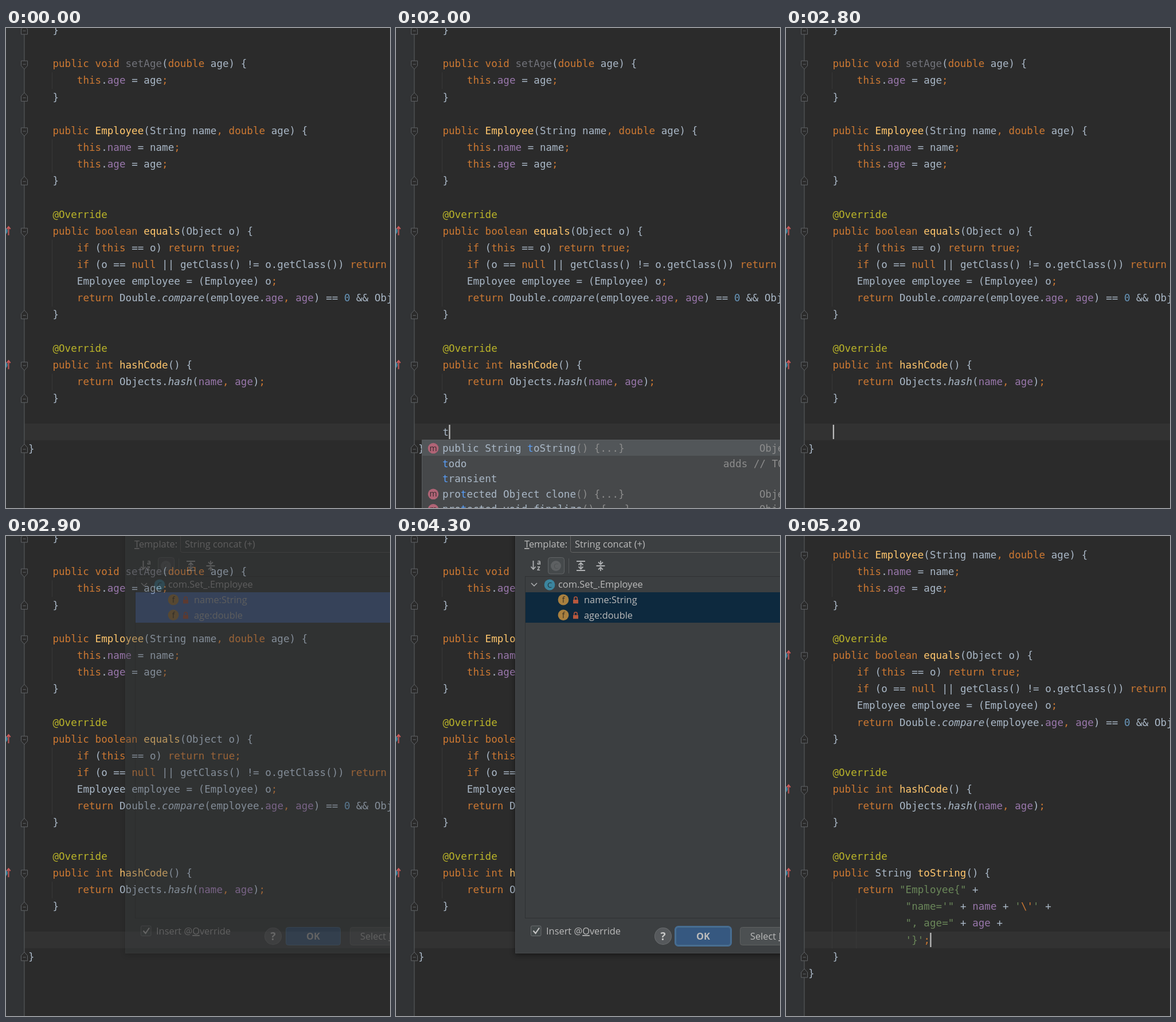
Animation, 670 px wide and 836 px high, one loop 6200 ms. Source, as an HTML page:

```html
<!DOCTYPE html>
<html lang="en">
<head>
<meta charset="utf-8">
<title>Generate toString</title>
<style>
html, body { margin: 0; width: 100%; height: 100%; overflow: hidden; background: #2b2b2b; }
svg { display: block; width: 100vw; height: 100vh; }
text { white-space: pre; fill: #bbb; }
.mono { font: 17.6px "DejaVu Sans Mono", monospace; fill: #a9b7c6; }
.ui { font: 16.4px "Open Sans", "Noto Sans", sans-serif; }
.hint { font: 13.6px "Open Sans", "Noto Sans CJK SC", "Noto Sans CJK", sans-serif; fill: #8c8c8c; }
.bold { font-weight: 700; }
.u { text-decoration: underline; }
.kw { fill: #cc7832; }
.str { fill: #6a8759; }
.num { fill: #6897bb; }
.fn { fill: #ffc66d; }
.field { fill: #9876aa; }
.note { fill: #bbb529; }
.dead { fill: #72737a; }
.it { font-style: italic; }
.match { fill: #589df6; }
.grey { fill: #8c8c8c; }
.fold { fill: #2b2b2b; stroke: #606366; }
.guide { stroke: #393939; }
.icon { fill: none; stroke: #afb1b3; stroke-width: 1.8; }
#dialog { filter: drop-shadow(0 3px 5px rgba(0, 0, 0, .45)); }
</style>
</head>
<body>
<svg id="stage" viewBox="0 0 670 836" preserveAspectRatio="none"></svg>
<script>
const LOOP = 6200, ROW = 29.15, CHAR = 10.6, LEFT = 39, BASE = 20.2;
const rowTop = i => i * ROW - 10.3;
const colX = c => LEFT + c * CHAR;
const esc = s => s.replace(/&/g, '&amp;').replace(/</g, '&lt;');
const span = (cls, s) => `<tspan class="${cls}">${esc(s)}</tspan>`;
const text = (x, y, cls, body) => `<text x="${x}" y="${y}" class="${cls}">${body}</text>`;
const rect = (x, y, w, h, fill, extra = '') =>
  `<rect x="${x}" y="${y}" width="${w}" height="${h}" fill="${fill}" ${extra}/>`;
const path = (d, extra) => `<path d="${d}" ${extra}/>`;
const disc = (x, y, r, fill) => `<circle cx="${x}" cy="${y}" r="${r}" fill="${fill}"/>`;

// Marks: ~field  !declared method  ?unused  ^static call
const TOKENS = /"[^"]*"|'}'|\\'|'|[~!?^]\w+|@\w+|\b(?:public|void|this|double|boolean|int|if|return|null|true|false)\b|\b\d+\b|[;,]|[^]/g;
const MARKS = { '~': 'field', '!': 'fn', '?': 'dead', '^': 'it' };

function paint(src, semantic) {
  return src.match(TOKENS).map(t => {
    const mark = t.length > 1 && MARKS[t[0]];
    if (mark) return semantic ? span(mark, t.slice(1)) : t.slice(1);
    if (t[0] === '@') return semantic ? span('note', t) : t;
    if (/^["']/.test(t)) return span('str', t);
    if (/^\d/.test(t)) return span('num', t);
    if (/^([;,]|\\'|\w{2,})$/.test(t)) return span('kw', t);
    return esc(t);
  }).join('');
}

function code(lines, first, semantic = true) {
  return lines.map((line, i) => {
    const src = line.trimStart();
    return src && text(colX(line.length - src.length), rowTop(first + i) + BASE, 'mono', paint(src, semantic));
  }).join('');
}

const foldStart = i => path(`M26.5 ${rowTop(i) + 9.2}h11v8.5l-5.5 6l-5.5-6zm3 6h5`, 'class="fold"');
const foldEnd = i => path(`M26.5 ${rowTop(i) + 21.3}h11v-9l-5.5-6l-5.5 6zm3-6h5`, 'class="fold"');
const guide = (x, a, b) => path(`M${x} ${rowTop(a)}V${rowTop(b + 1)}`, 'class="guide"');

function overrideIcon(i) {
  const y = rowTop(i) + 14;
  return disc(-3.5, y, 6.3, '#3e86a0') +
    path(`M4.5 ${y + 7.5}v-15m-3.2 4.2l3.2-4.2l3.2 4.2`, 'fill="none" stroke="#cb5a5a" stroke-width="1.9"');
}

const BODY = [
  '    }',
  '',
  '    public void ?setAge(double age) {',
  '        this.~age = age;',
  '    }',
  '',
  '    public !Employee(String name, double age) {',
  '        this.~name = name;',
  '        this.~age = age;',
  '    }',
  '',
  '    @Override',
  '    public boolean !equals(Object o) {',
  '        if (this == o) return true;',
  '        if (o == null || getClass() != o.getClass()) return false;',
  '        Employee employee = (Employee) o;',
  '        return Double.^compare(employee.~age, ~age) == 0 && Objects',
  '    }',
  '',
  '    @Override',
  '    public int !hashCode() {',
  '        return Objects.^hash(~name, ~age);',
  '    }'
];

const ADDED = [
  '    @Override',
  '    public String !toString() {',
  '        return "Employee{" +',
  '                "name=\'" + ~name + \'\\\'\' +',
  '                ", age=" + ~age +',
  "                '}';",
  '    }',
  '}'
];

const group = (id, body) => `<g id="${id}">${body}</g>`;

function popup(height, rows) {
  return rect(45.5, 717.5, 640, height, '#46484a', 'stroke="#5a5d5f"') +
    rect(46, 718, 640, 27, '#525659') +
    rows.map(([icon, head, match, tail, args, rightX, right], i) => {
      const y = 732 + i * 26.6;
      return (icon ? disc(65, y, 9.3, '#b06476') +
          `<text x="65" y="${y + 4.5}" class="ui" text-anchor="middle" style="font-size:14px;fill:#33282c">m</text>` : '') +
        text(81, y + 6, 'mono', span('', head) + span('match', match) + span('', tail) + span('grey', args)) +
        text(rightX, y + 6, 'mono', span('grey', right));
    }).join('');
}

const toStringRow = m => [1, 'public String ', 'toString'.slice(0, m), 'toString'.slice(m), '() {...}', 634, 'Object'];
const todoRow = m => [0, '', 'todo'.slice(0, m), 'todo'.slice(m), '', 571, 'adds // TODO'];

const popupOne = popup(140, [
  toStringRow(1),
  todoRow(1),
  [0, '', 't', 'ransient', '', 634, ''],
  [1, 'pro', 't', 'ected Object clone', '() {...}', 634, 'Object'],
  [1, 'pro', 't', 'ected void finalize', '() {...}', 634, 'Object']
]);

const popupTwo = popup(86, [toStringRow(2), todoRow(2)]) +
  text(60, 792, 'hint', 'Ctrl+向下箭头 and Ctrl+向上箭头 will move caret down and up in the editor') +
  text(538, 792, 'hint', span('match', 'Next Tip'));

function fieldRow(y, label) {
  return disc(292, y, 9.4, '#a9803f') +
    `<text x="292" y="${y + 5}" class="ui" text-anchor="middle" style="font-size:14px;fill:#382f22">f</text>` +
    rect(309, y, 9, 6.5, '#b8583d') +
    path(`M310.8 ${y}v-2.2a2.7 2.7 0 0 1 5.4 0v2.2`, 'fill="none" stroke="#b8583d" stroke-width="1.5"') +
    text(328, y + 6, 'ui', label);
}

function dialog() {
  const small = (x, y, s) => `<text x="${x}" y="${y}" class="ui bold" style="font-size:11.5px;fill:#afb1b3">${s}</text>`;
  return rect(208, -20, 480, 747, '#3c3f41') +
    path('M208.5 0V726.5H670', 'fill="none" stroke="#45484a"') +
    text(224, 20, 'ui', span('u', 'T') + 'emplate:') +
    rect(304.5, -10, 400, 38.5, '#3c3f41', 'rx="3" stroke="#646464"') +
    text(312, 20, 'ui', 'String concat (+)') +
    path('M239.5 43v15m-4-4.5l4 4.5l4-4.5', 'class="icon"') + small(246, 50, 'a') + small(246, 60, 'z') +
    rect(265.5, 37.5, 28, 28.5, '#45494b', 'rx="4" stroke="#616466"') +
    disc(279, 52, 9, '#5d6062') +
    '<text x="279" y="56.5" class="ui" text-anchor="middle" style="font-size:13px;fill:#505355">C</text>' +
    path('M301.5 39V65', 'stroke="#555759"') +
    path('M315 44h15M315 60h15M322.5 47v10m-4-6.5l4-4l4 4m-8 3l4 4l4-4', 'class="icon"') +
    path('M349.5 52h15M357 43v6m-4-3.5l4 4l4-4M357 61v-6m-4 3.5l4-4l4 4', 'class="icon"') +
    rect(225.5, 70.5, 470, 595, '#3c3f41', 'stroke="#2f3133"') +
    path('M236 82l5 5l5-5', 'class="icon" style="stroke-width:1.5"') +
    disc(268, 85, 9.4, '#3b859e') +
    '<text x="268" y="89.8" class="ui" text-anchor="middle" style="font-size:13px;fill:#22343b">C</text>' +
    text(283, 90, 'ui', 'com.Set_.Employee') +
    rect(226, 98, 460, 53, '#4b6eaf', 'id="picked"') +
    fieldRow(111, 'name:String') + fieldRow(137.7, 'age:double') +
    rect(235.5, 679, 17.5, 17.5, '#43494a', 'rx="2" stroke="#6b6d6f"') +
    path('M239.5 687.5l4 4.5l6.5-9.5', 'fill="none" stroke="#c4c4c4" stroke-width="2.2"') +
    text(262, 694, 'ui', 'Insert @' + span('u', 'O') + 'verride') +
    disc(466, 697, 15, '#6a6d6f') + disc(466, 697, 14, '#56595c') +
    '<text x="466" y="704" class="ui bold" text-anchor="middle" style="font-size:19px;fill:#c8c8c8">?</text>' +
    rect(487.5, 680.5, 97, 33, 'none', 'id="ring" rx="5" stroke="#466d94" stroke-width="3"') +
    rect(488.5, 681.5, 95, 31, '#365880', 'rx="4" stroke="#4c708c"') +
    '<text x="536" y="703" class="ui bold" text-anchor="middle">OK</text>' +
    rect(600.5, 681.5, 130, 31, '#4c5052', 'rx="4" stroke="#5e6060"') +
    text(618, 703, 'ui', 'Select ' + span('u', 'N') + 'one');
}

const stage = document.getElementById('stage');
stage.innerHTML =
  rect(0, 0, 670, 836, '#2b2b2b') +
  rect(0, 0, 32, 836, '#313335') +
  rect(32, 689, 638, 29, '#323232') +
  path('M31.9 0V836', 'stroke="#55585a" stroke-width="1.2"') +
  group('editor',
    guide(80.5, 3, 3) + guide(80.5, 7, 8) + guide(80.5, 13, 16) + guide(80.5, 21, 21) +
    [2, 6, 12, 20].map(foldStart).join('') + [0, 4, 9, 17, 22].map(foldEnd).join('') +
    overrideIcon(12) + overrideIcon(20) + code(BODY, 0) +
    group('before', foldEnd(25) + code(['}'], 25)) +
    group('after',
      guide(80.5, 26, 29) + guide(122.8, 27, 29) + foldEnd(31) +
      group('raw', code(ADDED, 24, false)) +
      group('parsed', foldStart(25) + foldEnd(30) + overrideIcon(25) + code(ADDED, 24)))) +
  `<text id="typed" x="${colX(4)}" y="${rowTop(24) + BASE}" class="mono"></text>` +
  group('popupOne', popupOne) + group('popupTwo', popupTwo) +
  rect(0, 691, 2.3, 25, '#bbb', 'id="caret"') +
  group('dialog', dialog());

const ui = {};
stage.querySelectorAll('[id]').forEach(el => ui[el.id] = el);
const show = (el, on) => el.setAttribute('display', on ? 'inline' : 'none');

function dialogAlpha(t) {
  if (t < 2900 || t >= 4600) return 0;
  if (t < 3000) return .35;
  if (t < 3100) return .8;
  if (t < 4400) return 1;
  return t < 4500 ? .55 : .2;
}

function render(t) {
  const within = (a, b) => t >= a && t < b;
  const done = t >= 4600, parsed = t >= 4800;
  const typed = within(2000, 2200) ? 't' : within(2200, 2800) ? 'to' : '';
  const alpha = dialogAlpha(t);

  ui.editor.setAttribute('transform', `translate(0 ${done ? -5 * ROW : 0})`);
  show(ui.before, !done);
  show(ui.after, done);
  show(ui.raw, !parsed);
  show(ui.parsed, parsed);

  ui.typed.textContent = typed;
  show(ui.popupOne, typed === 't');
  show(ui.popupTwo, typed === 'to');

  show(ui.caret, within(1500, 2900) || within(4600, 4800) || t >= 5200);
  ui.caret.setAttribute('x', colX(done ? 20 : 4 + typed.length) + .3);

  show(ui.dialog, alpha > 0);
  ui.dialog.setAttribute('opacity', alpha);
  ui.picked.setAttribute('fill', t < 4300 ? '#4b6eaf' : '#0d293e');
  show(ui.ring, t >= 4300);
}

const start = performance.now();
function tick() {
  render((performance.now() - start) % LOOP);
  requestAnimationFrame(tick);
}
tick();
</script>
</body>
</html>
```
